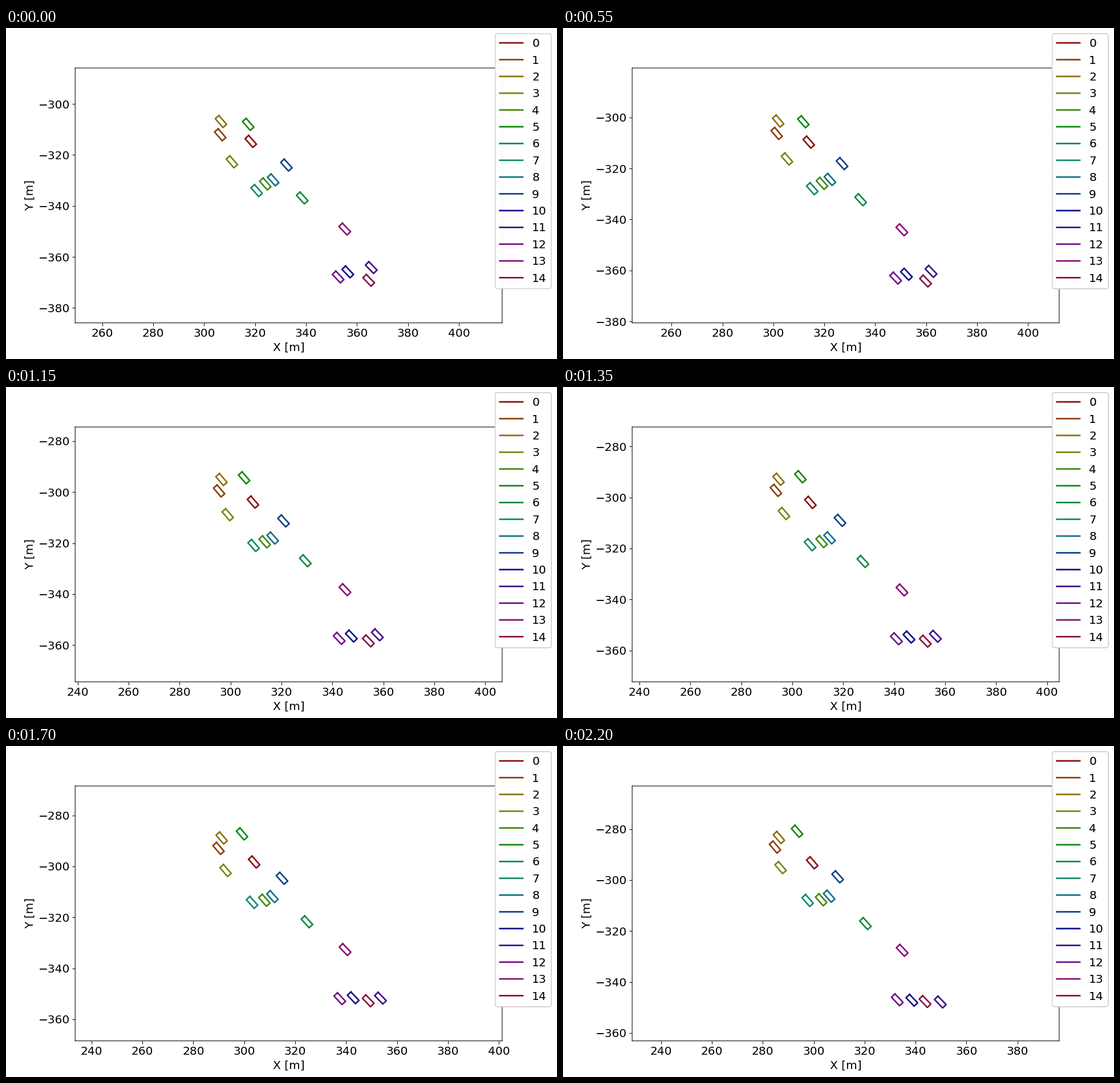
Recreate the animation shown at these times as a matplotlib script. Size 966x580 px, loop 2250 ms.

```python
import colorsys

import matplotlib.pyplot as plt
import numpy as np
from matplotlib.animation import FuncAnimation

DPI = 96
WIDTH, HEIGHT = 966, 580
FRAMES, INTERVAL = 45, 50
LENGTH, BREADTH = 4.6, 1.9      # car size in metres
HALF_Y = 50                     # half of the visible height in metres
LEGENDS = 5                     # translucent legends pile up until opaque
NUDGE = np.array([0.1, -0.1])   # half a pixel, in metres

plt.rcParams.update({"font.family": "DejaVu Sans", "font.size": 15.1,
                     "path.snap": False})

# Start x, start y and distance driven in one loop, in metres
CARS = np.array([
    (318.3, -314.7, 28.6), (306.3, -312.1, 33.0), (306.6, -306.9, 31.1),
    (310.9, -322.7, 36.5), (324.0, -331.4, 31.7), (317.3, -308.0, 36.1),
    (338.5, -336.9, 26.9), (320.6, -334.0, 34.7), (327.1, -329.8, 31.5),
    (332.3, -324.0, 34.1), (356.4, -365.9, 25.9), (365.6, -364.2, 22.8),
    (352.6, -367.9, 28.8), (355.2, -349.1, 29.7), (364.6, -369.2, 30.0)])
START, RUN = CARS[:, :2], CARS[:, 2:]

# Cars drive up and to the left; the road bends slightly along x
TILT = np.radians(47.75 - 0.06 * (START[:, 0] - START[:, 0].mean()))
AHEAD = np.column_stack([-np.cos(TILT), np.sin(TILT)])
ASIDE = np.column_stack([np.sin(TILT), np.cos(TILT)])

fig, ax = plt.subplots(figsize=(WIDTH / DPI, HEIGHT / DPI), dpi=DPI)
fig.subplots_adjust(left=0.1255, right=0.9005, bottom=0.1092, top=0.8792)
ax.set_xlabel("X [m]")
ax.set_ylabel("Y [m]")
for axis in (ax.xaxis, ax.yaxis):
    axis.set_major_locator(plt.MultipleLocator(20))

box = ax.get_position()
HALF_X = HALF_Y * box.width * WIDTH / (box.height * HEIGHT)

lines = [ax.plot([], [], lw=2, label=str(i),
                 color=colorsys.hls_to_rgb(i / len(CARS), 0.3, 0.8))[0]
         for i in range(len(CARS))]
legends = [fig.legend(handles=lines, loc="upper right", labelspacing=0.516)
           for _ in range(LEGENDS)]


def positions(frame):
    """Car centres; motion is sampled at 30 steps and shown at 20 per second."""
    t = (frame * 3 // 2) / ((FRAMES - 1) * 3 // 2)
    return START + AHEAD * RUN * t * (0.95 + 0.05 * t)


def outline(centre, ahead, aside):
    """Closed rectangle around a car."""
    u = np.array([[1], [1], [-1], [-1], [1]]) * LENGTH / 2
    v = np.array([[1], [-1], [-1], [1], [1]]) * BREADTH / 2
    return (centre + u * ahead + v * aside).T


def update(frame):
    centres = positions(frame)
    cx, cy = centres.mean(axis=0) + NUDGE
    ax.set_xlim(cx - HALF_X, cx + HALF_X)
    ax.set_ylim(cy - HALF_Y, cy + HALF_Y)
    for line, *pose in zip(lines, centres, AHEAD, ASIDE):
        line.set_data(*outline(*pose))
    for i, legend in enumerate(legends):
        legend.set_visible(i <= frame + 1)
    return lines


anim = FuncAnimation(fig, update, frames=FRAMES, interval=INTERVAL,
                     repeat=True, repeat_delay=0, blit=False)
plt.show()
```
